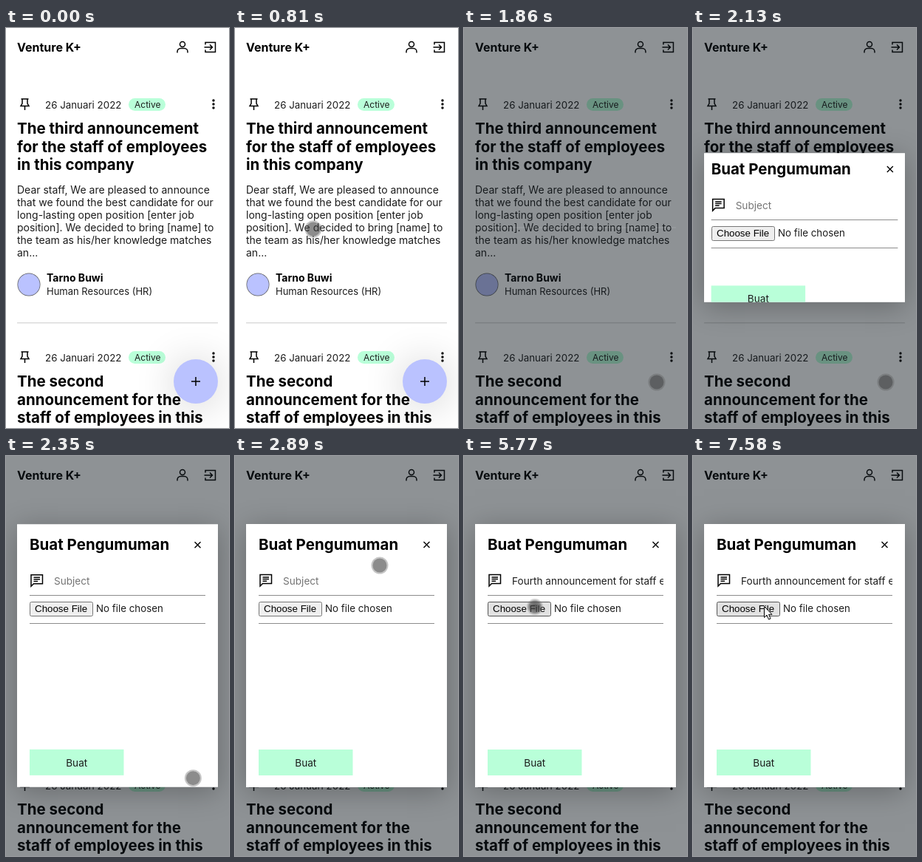
Animation of 302 by 541 pixels, one loop 8 s. Source, as an HTML page with a canvas:

```html
<!DOCTYPE html>
<html lang="id">
<head>
<meta charset="utf-8">
<title>Announcements</title>
<style>
html, body { margin: 0; width: 100%; height: 100%; overflow: hidden; background: #fff; }
canvas { display: block; width: 302px; height: 541px; }
</style>
</head>
<body>
<canvas id="stage" width="302" height="541"></canvas>
<script>
const ctx = document.getElementById('stage').getContext('2d');
const LOOP = 8000, W = 302, H = 541, OPEN = 1855;
const INK = '#000', BODY = '#1c1c1c', LILAC = '#bac2ff', MINT = '#b9ffd9';
const SUBJECT = 'Fourth announcement for staff employees in this company';

// Pointer path: time, x, y
const PATH = [
  [200, 252, 553], [810, 106, 272], [1080, 106, 272], [1600, 261, 479],
  [2220, 261, 479], [2560, 238, 348], [2700, 238, 348], [2890, 196, 148],
  [2960, 195, 148], [3500, 186, 172], [4660, 186, 172], [4850, 152, 184],
  [5220, 96, 204]
];
const TAPS = [[1660, 1790], [3560, 3640], [5480, 5600]];

const within = (t, a, b) => t >= a && t < b;
const clamp = v => Math.max(0, Math.min(1, v));
const smooth = v => v * v * (3 - 2 * v);

function text(str, x, y, size = 14, weight = 400, color = BODY, family = 'Inter') {
  ctx.font = `${weight} ${size}px ${family}, sans-serif`;
  ctx.fillStyle = color;
  ctx.fillText(str, x, y);
}

const heading = (str, x, y) => text(str, x, y, 20.5, 700, INK);

function rect(x, y, w, h, color) {
  ctx.fillStyle = color;
  ctx.fillRect(x, y, w, h);
}

function disc(x, y, r, color) {
  ctx.fillStyle = color;
  ctx.beginPath();
  ctx.arc(x, y, r, 0, Math.PI * 2);
  ctx.fill();
}

function stroke(d, x, y, width = 1.5, color = INK) {
  ctx.save();
  ctx.translate(x, y);
  ctx.lineWidth = width;
  ctx.strokeStyle = color;
  ctx.stroke(new Path2D(d));
  ctx.restore();
}

function shadow(color, blur, dy) {
  ctx.shadowColor = color;
  ctx.shadowBlur = blur;
  ctx.shadowOffsetY = dy;
}

function drawHeader() {
  text('Venture K+', 15, 32, 16, 700, INK);
  stroke('M-3.5 -4 a3.5 3.5 0 1 0 7 0 a3.5 3.5 0 1 0 -7 0 M-7 7.5 V6 a4.5 4.5 0 0 1 4.5 -4.5 h5 a4.5 4.5 0 0 1 4.5 4.5 V7.5', 239, 26);
  stroke('M-6.5 -3.5 V-6.5 H7 V6.5 H-6.5 V3.5 M-8 0 H2.5 M-.5 -3.5 L3 0 L-.5 3.5', 276.5, 26);
}

function drawPost(dy, titleLines) {
  ctx.save();
  ctx.translate(0, dy);
  stroke('M-5 -7 H5 M-3.5 -7 V-1 L-5.5 2.5 H5.5 L3.5 -1 V-7 M0 2.5 V8', 25.5, 103);
  text('26 Januari 2022', 53, 109, 13.33);
  ctx.fillStyle = MINT;
  ctx.beginPath();
  ctx.roundRect(166, 95, 50, 17, 8.5);
  ctx.fill();
  text('Active', 174, 108, 12);
  for (const y of [98, 103, 108]) disc(281, y, 1.7, INK);
  titleLines.forEach((line, i) => heading(line, 15, 143 + i * 24.5));
  ctx.restore();
}

function drawPage(withButton) {
  rect(0, 0, W, H, '#fff');
  drawHeader();
  drawPost(0, ['The third announcement', 'for the staff of employees', 'in this company']);
  ['Dear staff, We are pleased to announce',
   'that we found the best candidate for our',
   'long-lasting open position [enter job',
   'position]. We decided to bring [name] to',
   'the team as his/her knowledge matches',
   'an...'].forEach((line, i) => text(line, 15, 224 + i * 17));

  disc(31, 347, 15.5, '#555');
  disc(31, 347, 14.8, LILAC);
  text('Tarno Buwi', 55, 343, 14, 700, INK);
  text('Human Resources (HR)', 55, 361, 13);
  rect(15, 398, 272, 1.5, '#dcdcdc');
  drawPost(342, ['The second', 'announcement for the', 'staff of employees in this']);

  if (withButton) {
    ctx.save();
    shadow('rgba(0,0,0,.2)', 56, 3);
    disc(257, 478, 30, LILAC);
    ctx.restore();
    stroke('M-6 0 H6 M0 -6 V6', 257, 478);
  }
}

function drawSubject(t, left, right, baseline) {
  const width = right - left, size = 13.6;
  ctx.save();
  ctx.beginPath();
  ctx.rect(left, baseline - 15, width, 20);
  ctx.clip();
  if (t < 4230) {
    text('Subject', left, baseline, size, 400, '#757575');
  } else {
    ctx.font = `400 ${size}px Inter, sans-serif`;
    const scroll = t < 5480 ? ctx.measureText(SUBJECT).width - width + 1 : 0;
    text(SUBJECT, left - scroll, baseline, size);
  }
  if (within(t, 3600, 4100)) rect(left, baseline - 13, 1, 16, INK);
  if (within(t, 4230, 4710) || within(t, 5220, 5480)) rect(right - 1, baseline - 13, 1, 16, INK);
  ctx.restore();
}

function drawFilePicker(t, x, y) {
  const pressed = within(t, 5480, 5770), hover = t >= 5370;
  ctx.fillStyle = pressed ? '#f5f5f5' : hover ? '#e2e2e2' : '#efefef';
  ctx.strokeStyle = hover ? '#555' : '#767676';
  ctx.lineWidth = 1;
  ctx.beginPath();
  ctx.roundRect(x + .5, y + .5, 85, 19, 2);
  ctx.fill();
  ctx.stroke();
  text('Choose File', x + 7, y + 14, 13.33, 400, INK, '"Liberation Sans"');
  text('No file chosen', x + 90, y + 14, 13.33);
}

function drawModal(t) {
  const p = smooth(clamp((t - OPEN) / 507));
  if (p <= 0) return;
  const height = 356 * p, top = 270 - height / 2;
  const pad = 17 * p, left = 15 + pad, right = 287 - pad;
  const y0 = top - 14 * (1 - p);

  ctx.save();
  shadow('rgba(0,0,0,.28)', 36, 6);
  rect(15, top, 272, height, '#fff');
  ctx.restore();

  ctx.save();
  ctx.beginPath();
  ctx.rect(15, top, 272, height);
  ctx.clip();
  heading('Buat Pengumuman', left, y0 + 35);
  stroke('M-4 -4 L4 4 M4 -4 L-4 4', right - 10.5, y0 + 28, 1.4);
  stroke('M-7.5 8 V-7.5 H8 V4.5 H-4 Z M-4 -4 H4.5 M-4 -1.5 H4.5 M-4 1.2 H1.5', left + 9.5, y0 + 76, 1.5);
  drawSubject(t, left + 33, right, y0 + 82);
  rect(left, Math.round(y0 + 96), right - left, 1, '#8c8c8c');
  drawFilePicker(t, Math.round(left), Math.round(y0 + 105));
  rect(left, Math.round(y0 + 134), right - left, 1, '#8c8c8c');
  const buttonY = top + Math.max(134, 15 + 290 * p);
  rect(left, buttonY, 127.5, 35, MINT);
  ctx.textAlign = 'center';
  text('Buat', left + 63.75, buttonY + 23, 13.6);
  ctx.restore();
}

function pointerAt(t) {
  const next = PATH.findIndex(k => k[0] > t);
  if (next < 0) return PATH[PATH.length - 1].slice(1);
  const [t0, x0, y0] = PATH[next - 1], [t1, x1, y1] = PATH[next];
  const k = smooth((t - t0) / (t1 - t0));
  return [x0 + (x1 - x0) * k, y0 + (y1 - y0) * k];
}

function drawArrow(t) {
  ctx.save();
  ctx.translate(96, 203);
  const arrow = new Path2D('M.5 .5 V15.5 L4 12.2 L6.5 18 L9 17 L6.6 11.3 H11 Z');
  ctx.fillStyle = '#fff';
  ctx.fill(arrow);
  ctx.strokeStyle = INK;
  ctx.lineWidth = 1;
  ctx.stroke(arrow);
  if (within(t, 6840, 7580)) {
    const turn = (t - 6840) / 740 * Math.PI * 2;
    ctx.lineWidth = 2;
    ctx.strokeStyle = '#8fcdf0';
    ctx.beginPath();
    ctx.arc(15.5, 7, 4.3, 0, Math.PI * 2);
    ctx.stroke();
    ctx.strokeStyle = '#1b86c8';
    ctx.beginPath();
    ctx.arc(15.5, 7, 4.3, turn, turn + 1.6);
    ctx.stroke();
  }
  ctx.restore();
}

function drawPointer(t) {
  if (t < 200) return;
  if (t >= 6700) return drawArrow(t);
  const [x, y] = pointerAt(t);
  if (TAPS.some(([a, b]) => within(t, a, b))) {
    disc(x, y, 11, 'rgba(188,190,45,.82)');
    disc(x, y, 7.5, 'rgba(100,100,40,.22)');
  } else if (t >= 5600) {
    const glow = ctx.createRadialGradient(x, y, 3, x, y, 11.5);
    glow.addColorStop(0, 'rgba(60,60,60,.75)');
    glow.addColorStop(.55, 'rgba(80,80,80,.65)');
    glow.addColorStop(1, 'rgba(130,130,130,.1)');
    disc(x, y, 11.5, glow);
  } else {
    disc(x, y, 11.5, 'rgba(90,90,90,.35)');
    disc(x, y, 9.5, 'rgba(43,43,43,.37)');
  }
}

function frame() {
  const t = (performance.now() - start) % LOOP;
  const open = t >= OPEN;
  drawPage(!open);
  if (open) {
    rect(0, 0, W, H, 'rgba(16,24,30,.47)');
    drawModal(t);
  }
  drawPointer(t);
  requestAnimationFrame(frame);
}

const start = performance.now();
frame();
</script>
</body>
</html>
```
